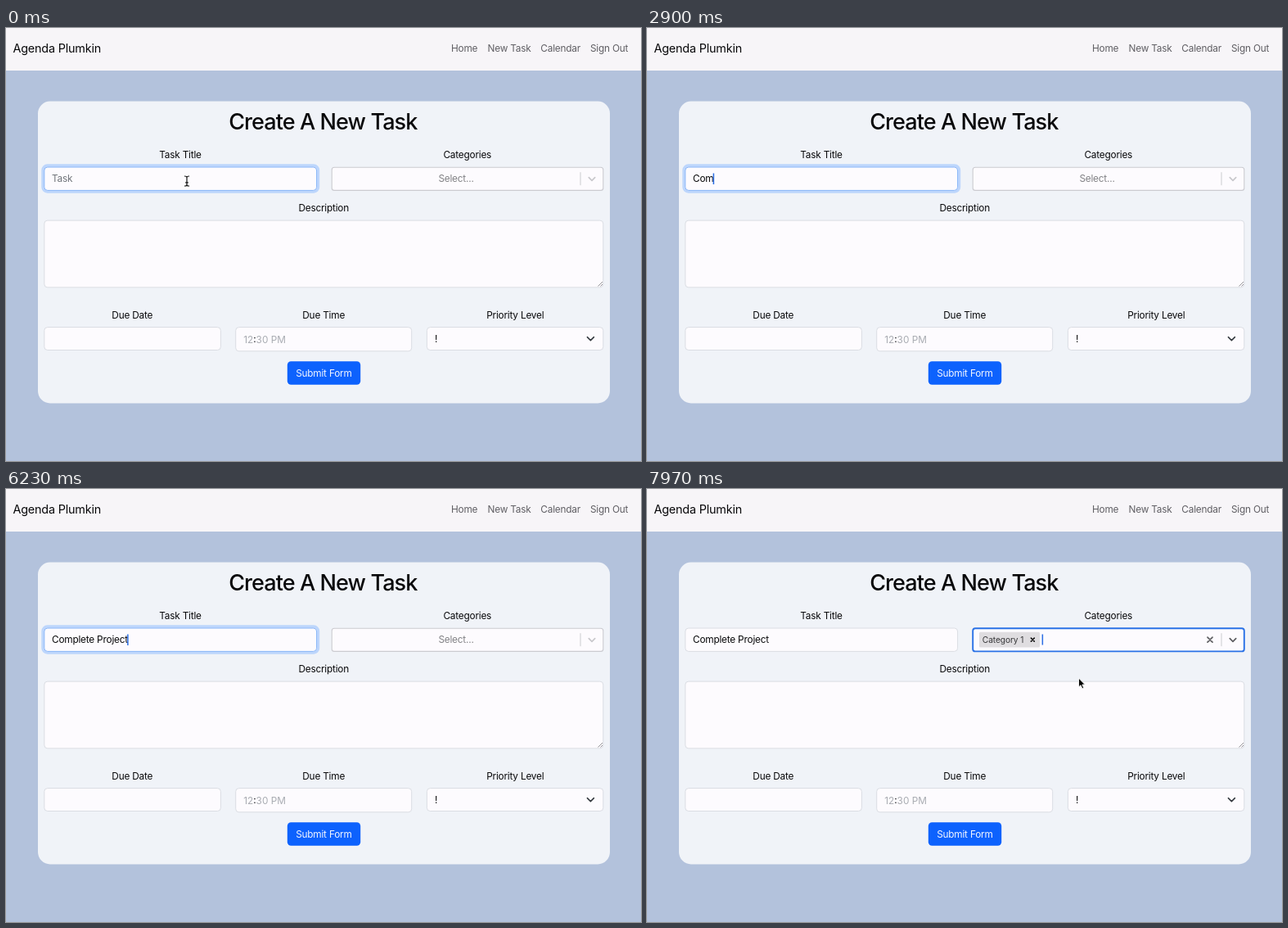
An HTML page for the animation above (8 s loop, 776x529 px).

```html
<!DOCTYPE html>
<html lang="en">
<head>
<meta charset="utf-8">
<title>Create A New Task</title>
<style>
  html, body { margin: 0; width: 100%; height: 100%; overflow: hidden; background: #b3c2dc; }
  svg { display: block; width: 100vw; height: 100vh; }
  text {
    font: 11.8px Inter, "Open Sans", sans-serif;
    letter-spacing: -.2px;
    font-optical-sizing: none;
    white-space: pre;
    fill: #08080a;
  }
  .mid { text-anchor: middle; }
  .nav { fill: #5f5e63; }
  .brand { font-size: 14.4px; }
  .head { font-size: 27px; font-weight: 500; letter-spacing: -.9px; }
  .hint { fill: #70747a; }
  .pale { fill: #a9acb2; }
  .chip { font-size: 10.2px; letter-spacing: -.1px; fill: #363638; }
  .field { fill: #fdfbfe; stroke: #dadde3; }
  .line { fill: none; stroke-linecap: round; stroke-linejoin: round; }
  .caret { fill: #2a6de4; }
</style>
</head>
<body>
<svg viewBox="0 0 776 529">
  <defs>
    <filter id="soft" x="-10%" y="-20%" width="120%" height="150%">
      <feDropShadow dx="0" dy="3" stdDeviation="4" flood-color="#000" flood-opacity=".14"/>
    </filter>
  </defs>

  <rect width="776" height="529" fill="#b3c2dc"/>
  <rect width="776" height="52" fill="#f7f5f8"/>
  <text class="brand" x="8.5" y="30">Agenda Plumkin</text>
  <text class="nav" x="544" y="29.3">Home</text>
  <text class="nav" x="588.5" y="29.3">New Task</text>
  <text class="nav" x="653.3" y="29.3">Calendar</text>
  <text class="nav" x="714" y="29.3">Sign Out</text>

  <rect x="39" y="89.5" width="699" height="369" rx="15" fill="#f0f3f8"/>
  <text class="head mid" x="387.3" y="124">Create A New Task</text>
  <text class="mid" x="213" y="159.3">Task Title</text>
  <text class="mid" x="563.8" y="159.3">Categories</text>
  <text class="mid" x="388.2" y="223.8">Description</text>
  <text class="mid" x="154.3" y="354.8">Due Date</text>
  <text class="mid" x="388.2" y="354.8">Due Time</text>
  <text class="mid" x="622.3" y="354.8">Priority Level</text>

  <rect id="ring" x="45" y="168" width="336.5" height="32" rx="5.5" fill="none" stroke="#bdd6fc" stroke-width="3.4"/>
  <rect id="title" class="field" x="46.8" y="170" width="332.8" height="28.4" rx="4"/>
  <text id="typed" x="56" y="188.4"></text>
  <rect id="caret" class="caret" y="177.5" width="1.5" height="13.5"/>

  <rect id="select" x="398.2" y="170.2" width="331.6" height="28.2" rx="3" fill="#fdfbfe"/>
  <path d="M702 176.2v16" stroke="#cbcbcf"/>
  <path id="arrow" class="line" d="M712.3 182.7l3.7 3.6 3.7-3.6" stroke-width="1.7"/>
  <text id="prompt" class="mid" x="550" y="188.4" fill="#808084" style="fill:#808084">Select...</text>
  <g id="chip">
    <rect x="406" y="174.8" width="74" height="18.8" rx="1.5" fill="#dfdde0"/>
    <text class="chip" x="409.8" y="188">Category 1</text>
    <path class="line" d="M469.3 182.1l4 4m0-4l-4 4" stroke="#111" stroke-width="1.5"/>
    <path class="line" d="M685 181.1l6 6m0-6l-6 6" stroke="#636366" stroke-width="1.8"/>
  </g>
  <rect id="caret2" class="caret" y="177.5" width="1.5" height="13"/>

  <rect class="field" x="46.8" y="235.1" width="683" height="81.8" rx="4"/>
  <path d="M723.5 315.5l5.5-5.5m-2.5 5.5l2.5-2.5" stroke="#77777c" stroke-width=".8"/>
  <rect class="field" x="46.8" y="365.6" width="215.6" height="27.9" rx="4"/>
  <rect class="field" x="280.7" y="365.6" width="215" height="29.2" rx="4"/>
  <rect class="field" x="514.4" y="365.6" width="215.4" height="27.9" rx="4"/>
  <text class="pale" x="290.2" y="384.7" style="letter-spacing:0">12<tspan fill="#08080a">:</tspan>30 PM</text>
  <text x="524" y="384">!</text>
  <path class="line" d="M710.4 377.6l4 4 4-4" stroke="#34383e" stroke-width="1.5"/>
  <rect x="343.8" y="407.2" width="89.4" height="28.6" rx="4.5" fill="#0d62fd"/>
  <text class="mid" x="388.4" y="426" style="fill:#f4f7ff">Submit Form</text>

  <g id="menu">
    <rect x="398" y="205" width="332" height="95.7" rx="3" fill="#fdfbfe" stroke="#dddce1" filter="url(#soft)"/>
    <rect x="398" y="207.8" width="332" height="29.6" fill="#d7e3fb"/>
    <text class="mid" x="563.8" y="227">Category 1</text>
    <text class="mid" x="563.8" y="257">Category 2</text>
    <text class="mid" x="563.8" y="287">Category 3</text>
  </g>

  <path id="beam" class="line" d="M-2.6-6q2.6 0 2.6 1.6v8.8q0 1.6-2.6 1.6M2.6-6q-2.6 0-2.6 1.6v8.8q0 1.6 2.6 1.6M-1.4 1.8h2.8" stroke="#111" stroke-width="1.2"/>
  <path id="pointer" d="M0 0v11l2.5-2.3 1.9 4.2 1.9-.8-1.9-4.1h3.5z" fill="#050505" stroke="#fff" stroke-width=".9" stroke-linejoin="round"/>
</svg>

<script>
const LOOP = 8000, HIDE = 1300, WAKE = 6350, OPEN = 7350, PICK = 7840;
const PHRASE = "Complete Project";
const KEYS = [2560, 2700, 2860, 3000, 3140, 3280, 3700, 3850, 4000,
              4560, 4850, 5120, 5500, 5680, 5860, 6050];
// time, x, y
const PATH = [[WAKE, 221, 187], [6550, 250, 187], [6750, 375, 187], [6900, 473.5, 187],
              [6980, 521, 189], [7150, 515, 193], [7480, 515, 193], [7750, 527.5, 231]];

const el = id => document.getElementById(id);
const set = (id, attrs) => {
  for (const k in attrs) el(id).setAttribute(k, attrs[k]);
};
const show = (id, on) => set(id, { visibility: on ? "visible" : "hidden" });
const clamp = v => Math.min(1, Math.max(0, v));
const ease = v => { v = clamp(v); return v * v * (3 - 2 * v); };
const blinkOn = age => Math.floor(age / 500) % 2 === 0;
const mix = (a, b, p) => `rgb(${a.map((v, i) => Math.round(v + (b[i] - v) * p))})`;

function pointerAt(t) {
  if (t <= PATH[0][0]) return PATH[0].slice(1);
  for (let i = 1; i < PATH.length; i++) {
    const [t0, x0, y0] = PATH[i - 1], [t1, x1, y1] = PATH[i];
    if (t < t1) {
      const p = (t - t0) / (t1 - t0);
      return [x0 + (x1 - x0) * p, y0 + (y1 - y0) * p];
    }
  }
  return PATH[PATH.length - 1].slice(1);
}

function drawTitle(t) {
  const count = KEYS.filter(k => k <= t).length;
  const typed = el("typed");
  const text = count ? PHRASE.slice(0, count) : "Task";
  if (typed.textContent !== text) typed.textContent = text;
  typed.setAttribute("class", count ? "" : "hint");

  const x = 56 + (count ? typed.getComputedTextLength() - .8 : .2);
  set("caret", { x });
  show("caret", t < OPEN && blinkOn(count ? t - KEYS[count - 1] : t + 500));

  const blur = ease((t - OPEN) / 170);
  set("ring", { opacity: 1 - blur });
  set("title", { style: `stroke:${mix([134, 180, 248], [218, 221, 227], blur)}` });
}

function drawSelect(t, x) {
  const open = t >= OPEN, picked = t >= PICK;
  const hover = t >= WAKE && x > 398;
  set("select", {
    stroke: open ? "#2a72e6" : hover ? "#b0b0b5" : "#cbcbd0",
    "stroke-width": open ? 1.9 : 1.1
  });
  set("arrow", { stroke: mix([200, 200, 204], [92, 92, 96], ease((t - OPEN) / 150)) });
  show("prompt", !picked);
  show("chip", picked);
  show("menu", open && !picked);
  set("caret2", { x: picked ? 482.6 : 406.2 });
  show("caret2", open && blinkOn(t - (picked ? PICK : OPEN)));
}

function draw(t) {
  const [x, y] = pointerAt(t);
  const overText = x < 390;
  const visible = t < HIDE || t >= WAKE;
  drawTitle(t);
  drawSelect(t, x);
  for (const id of ["beam", "pointer"]) set(id, { transform: `translate(${x} ${y})` });
  show("beam", visible && overText);
  show("pointer", visible && !overText);
}

const start = performance.now();
function tick() {
  draw((performance.now() - start) % LOOP);
  requestAnimationFrame(tick);
}
tick();
</script>
</body>
</html>
```
